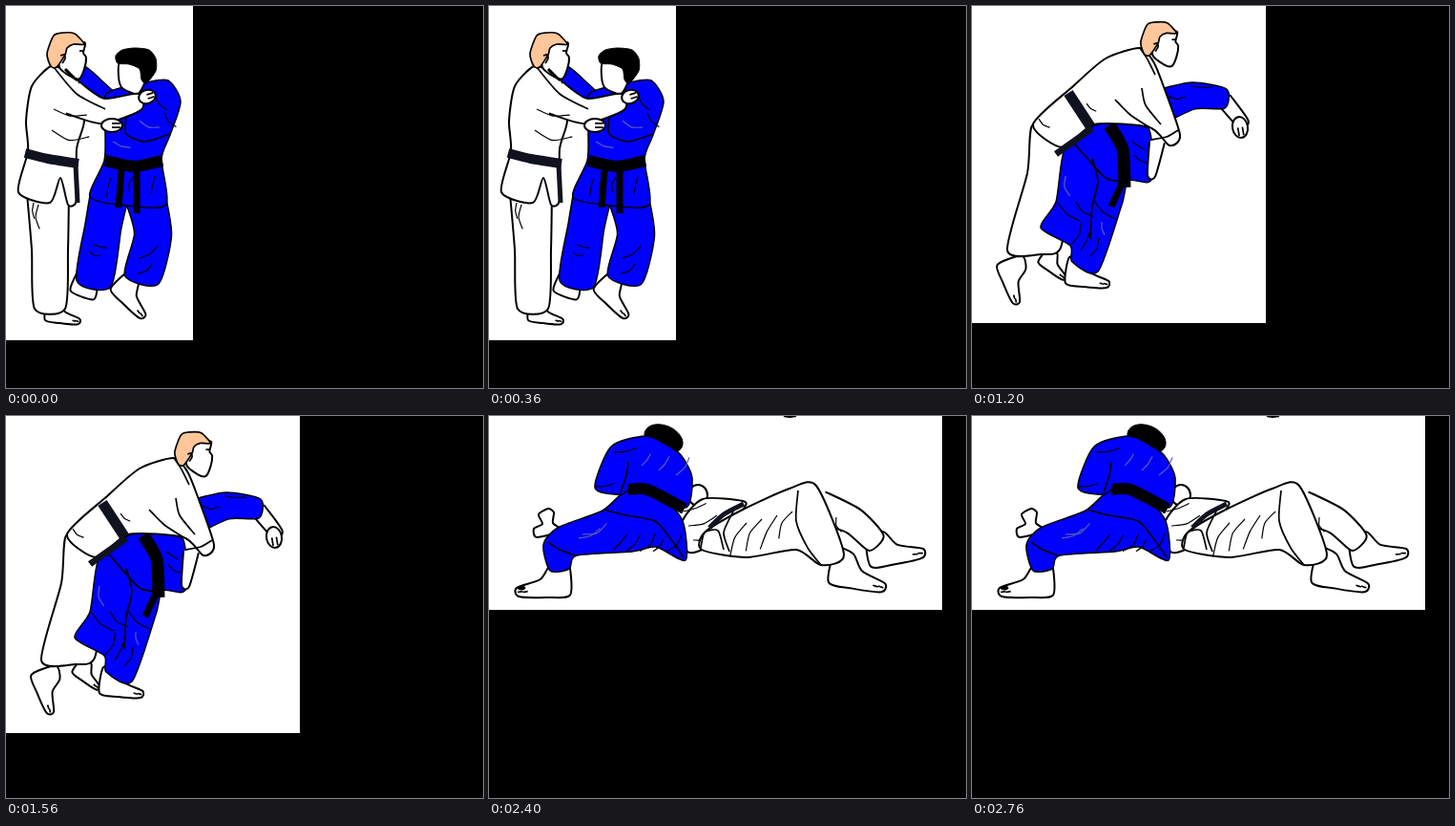
Write an HTML page with a canvas that moves like this. It is 500x400 px and loops after 3 s.

```html
<!DOCTYPE html>
<html lang="en">
<head>
<meta charset="utf-8">
<title>Judo throw</title>
<style>
html, body { margin: 0; width: 100%; height: 100%; overflow: hidden; background: #000; }
canvas { display: block; }
</style>
</head>
<body>
<canvas id="stage" width="500" height="400"></canvas>
<script>
const ctx = document.getElementById('stage').getContext('2d');
const POSE_MS = 600;
const INK = '#000', NAVY = '#10131f', SHEEN = '#5c5cb0';
const white = { fill: '#fff', width: 2 }, blue = { fill: '#00f', width: 1.5 };
const skin = { fill: '#ffc799', width: 1.7 }, black = { fill: INK, width: 1 };

let seed;
const random = () => (seed = (seed * 16807) % 2147483647) / 2147483647;

// Rounded path through x,y pairs.
function trace(c, closed) {
  const n = c.length / 2;
  const at = i => {
    i = closed ? (i + n) % n : Math.max(0, Math.min(n - 1, i));
    return [c[2 * i], c[2 * i + 1]];
  };
  ctx.beginPath();
  ctx.moveTo(c[0], c[1]);
  for (let i = 0; i < (closed ? n : n - 1); i++) {
    const [a, b, d, e] = [at(i - 1), at(i), at(i + 1), at(i + 2)];
    ctx.bezierCurveTo(b[0] + (d[0] - a[0]) / 8, b[1] + (d[1] - a[1]) / 8,
      d[0] - (e[0] - b[0]) / 8, d[1] - (e[1] - b[1]) / 8, d[0], d[1]);
  }
  if (closed) ctx.closePath();
}
function paint(style, c, closed) {
  trace(c, closed);
  ctx.fillStyle = style.fill;
  ctx.fill();
  ctx.strokeStyle = INK;
  ctx.lineWidth = style.width;
  ctx.stroke();
}
const blob = (style, ...c) => paint(style, c, true);

function stroke(color, width, ...c) {
  trace(c, false);
  ctx.strokeStyle = color;
  ctx.lineWidth = width;
  ctx.stroke();
}
const line = (...c) => stroke(INK, 1.7, ...c);

// Tapered tube along a spine, open where it joins the body.
function limb(style, from, to, ...c) {
  const n = c.length / 2, left = [], right = [];
  for (let i = 0; i < n; i++) {
    const a = 2 * Math.max(0, i - 1), b = 2 * Math.min(n - 1, i + 1);
    const dir = Math.atan2(c[b + 1] - c[a + 1], c[b] - c[a]);
    const half = (from + (to - from) * i / (n - 1)) / 2;
    const dx = half * Math.sin(dir), dy = -half * Math.cos(dir);
    left.push(c[2 * i] + dx, c[2 * i + 1] + dy);
    right.unshift(c[2 * i] - dx, c[2 * i + 1] - dy);
  }
  paint(style, [...left, ...right], false);
}
function oval(style, x, y, rx, ry, turned = 0) {
  ctx.beginPath();
  ctx.ellipse(x, y, rx, ry, turned, 0, 7);
  ctx.fillStyle = style.fill;
  ctx.fill();
  ctx.strokeStyle = INK;
  ctx.lineWidth = style.width;
  ctx.stroke();
}
// A row of slightly uneven folds with roots between two points.
function pleats(count, x0, y0, x1, y1, dx, dy, color = INK) {
  for (let i = 0; i < count; i++) {
    const t = count > 1 ? i / (count - 1) : 0, len = 0.7 + 0.5 * random(), bend = 0.2 * random();
    const x = x0 + (x1 - x0) * t, y = y0 + (y1 - y0) * t;
    stroke(color, 1.2, x, y, x + len * (dx / 2 - dy * bend), y + len * (dy / 2 + dx * bend),
      x + len * dx, y + len * dy);
  }
}

// Moves a small local shape into place.
function place(c, x, y, angle, size, flip = 1) {
  const cos = Math.cos(angle) * size, sin = Math.sin(angle) * size, out = [];
  for (let i = 0; i < c.length; i += 2) {
    const u = c[i] * flip, v = c[i + 1];
    out.push(x + u * cos - v * sin, y + u * sin + v * cos);
  }
  return out;
}
function foot(...spot) {
  const sole = [-0.2, -0.4, 0.2, -0.35, 0.45, 0, 1, 0.2, 0.95, 0.4, 0.3, 0.42, -0.25, 0.36];
  blob(white, ...place(sole, ...spot));
  for (const toe of [0.74, 0.86]) line(...place([toe, 0.28, toe + 0.12, 0.3], ...spot));
}
function fist(x, y, rx, ry, angle = 0) {
  oval(white, x, y, rx, ry, angle);
  for (const v of [-0.3, 0.3]) line(...place([0, v * ry, rx * 0.8, v * ry], x, y, angle, 1));
}
function fairHead(...spot) {
  const at = (...c) => place(c, ...spot);
  blob(white, ...at(-6, -6, 18, -12, 17, -1, 20, 4, 18, 16, 13, 26, 4, 24, -8, 14));
  blob(skin, ...at(-17, 13, -21, 0, -14, -19, -4, -22, 8, -21, 18, -10, 7, -10, 0, -6, -2, 1, -11, 14));
  line(...at(-7, 2, -3, 1, -2, 5, -5, 10));
  line(...at(13, -3, 17, -3));
}
function darkHead(...spot) {
  const at = (...c) => place(c, ...spot);
  blob(white, ...at(-16, -6, -18, 10, -14, 22, 2, 28, 10, 14, 8, -2));
  blob(black, ...at(-19, -4, -21, -12, -14, -18, -1, -20, 14, -18, 21, -9, 21, 4, 11, 17, 6, 13, 4, 2, -7, -3));
}

function grip() {
  foot(82, 296, 2, 33, -1);
  foot(125, 293, 0.75, 36);
  foot(49, 319, 0.1, 29);
  limb(blue, 40, 36, 108, 200, 102, 230, 92, 291);
  limb(blue, 42, 36, 147, 204, 154, 240, 142, 287);
  pleats(2, 88, 258, 92, 250, 16, 4);
  pleats(2, 140, 264, 138, 280, 18, -12);
  limb(blue, 22, 18, 110, 102, 92, 84, 76, 70);
  blob(blue, 105, 92, 147, 80, 170, 78, 183, 100, 172, 135, 163, 160, 168, 208, 128, 209,
    88, 200, 103, 162, 104, 130);
  line(126, 116, 126, 134, 146, 142, 172, 134);
  pleats(2, 156, 94, 166, 112, 12, 14);
  pleats(3, 110, 180, 156, 178, -4, 18);
  pleats(2, 112, 142, 140, 120, 18, 6, SHEEN);
  stroke(INK, 12, 104, 162, 134, 168, 164, 162);
  stroke(INK, 7, 121, 172, 118, 211);
  stroke(INK, 7, 137, 173, 137, 217);
  darkHead(136, 64, 0, 1);
  limb(white, 44, 32, 44, 196, 46, 255, 46, 317);
  pleats(2, 29, 206, 34, 208, 1, 22);
  blob(white, 47, 63, 27, 84, 21, 120, 23, 152, 13, 195, 46, 206, 57, 180, 65, 208, 74, 203,
    74, 150, 82, 120, 76, 78, 62, 68);
  limb(white, 36, 17, 70, 96, 102, 110, 140, 100);
  line(50, 64, 74, 92, 104, 108);
  pleats(2, 50, 108, 48, 130, 34, 6);
  stroke(NAVY, 10, 20, 154, 44, 160, 76, 165);
  stroke(NAVY, 5, 73, 166, 75, 206);
  fist(148, 95, 9, 7, -0.3);
  fist(111, 125, 11, 7);
  fairHead(64, 50, 0, 1);
  stroke(INK, 3, 62, 66, 70, 74, 75, 78);
}

function turn() {
  foot(86, 295, 0.3, 33);
  foot(52, 309, 0.25, 32);
  limb(white, 15, 11, 96, 48, 110, 28);
  oval(white, 114, 25, 10, 7, -0.6);
  oval(black, 118, 21, 6, 3, -0.3);
  limb(blue, 38, 16, 102, 84, 96, 47);
  blob(blue, 80, 156, 72, 215, 75, 246, 67, 276, 105, 290, 148, 250, 138, 200, 136, 170);
  pleats(3, 112, 206, 110, 230, 22, 24);
  pleats(3, 76, 244, 100, 280, 26, -8);
  blob(blue, 98, 116, 150, 102, 180, 96, 196, 122, 182, 138, 166, 140, 141, 163, 139, 210,
    78, 182, 87, 142);
  line(156, 108, 154, 128, 166, 135, 182, 138);
  pleats(2, 162, 108, 158, 124, 20, 4);
  pleats(2, 104, 130, 126, 140, 24, -8);
  pleats(2, 90, 158, 140, 146, 14, 8, SHEEN);
  stroke(INK, 11, 87, 142, 120, 152, 141, 162);
  stroke(INK, 7, 122, 157, 107, 192);
  stroke(INK, 7, 134, 164, 127, 205);
  darkHead(155, 73, 0.12, 0.92);
  limb(white, 40, 32, 54, 186, 54, 250, 52, 304);
  pleats(2, 48, 198, 64, 200, -1, 20);
  blob(white, 53, 55, 36, 80, 35, 140, 26, 185, 69, 195, 76, 160, 97, 117, 100, 76, 84, 65);
  limb(white, 44, 20, 82, 92, 120, 95, 156, 94);
  line(53, 55, 66, 72, 88, 92, 120, 102);
  pleats(2, 42, 132, 64, 104, 40, -2);
  pleats(2, 46, 154, 64, 160, -2, 24);
  stroke(NAVY, 9, 34, 142, 58, 150, 81, 156);
  stroke(NAVY, 4, 81, 158, 84, 182, 82, 206);
  fist(166, 97, 9, 6, -0.2);
  fist(136, 117, 17, 6, 0.1);
  fairHead(70, 42, 0, 1);
}

function load() {
  foot(42, 274, 1.15, 36);
  foot(80, 264, 0.6, 26);
  foot(108, 278, 0.08, 36);
  limb(white, 16, 12, 264, 98, 285, 124);
  fist(281, 127, 11, 8, 1.4);
  limb(blue, 36, 20, 196, 106, 232, 94, 266, 97);
  pleats(2, 206, 94, 230, 84, 26, 1);
  blob(white, 64, 124, 58, 175, 37, 256, 72, 260, 94, 250, 100, 150);
  blob(blue, 126, 126, 97, 150, 88, 205, 72, 232, 103, 251, 105, 268, 132, 278, 157, 208,
    164, 183, 188, 182, 185, 128, 150, 122);
  line(104, 140, 116, 154, 140, 180, 160, 184);
  line(126, 160, 132, 184, 126, 210, 124, 244);
  pleats(3, 90, 206, 128, 204, 22, 18);
  pleats(3, 104, 250, 124, 262, 10, -22);
  pleats(2, 168, 142, 170, 156, 12, 8);
  pleats(2, 98, 178, 136, 226, 4, 18, SHEEN);
  stroke(INK, 13, 144, 125, 158, 150, 160, 190);
  stroke(INK, 7, 158, 184, 146, 210);
  limb(white, 16, 8, 194, 142, 188, 178);
  blob(white, 176, 44, 140, 55, 106, 84, 64, 124, 95, 148, 128, 124, 186, 127, 207, 146,
    218, 135, 200, 82, 190, 58);
  line(176, 44, 184, 56, 192, 72);
  line(150, 98, 166, 114, 186, 127);
  line(178, 86, 182, 104, 198, 124);
  line(188, 140, 204, 137, 216, 130);
  pleats(2, 70, 118, 120, 102, 10, 8);
  stroke(NAVY, 11, 101, 91, 124, 126);
  stroke(NAVY, 7, 126, 128, 88, 155);
  fairHead(197, 38, 0, 0.96);
}

function fling() {
  limb(white, 16, 24, 149, 62, 147, 48, 142, 28);
  pleats(2, 137, 38, 143, 48, 14, -4);
  limb(white, 15, 19, 230, 38, 229, 24, 229, 8);
  pleats(2, 226, 16, 232, 16, 0, 14);
  limb(white, 40, 26, 204, 186, 180, 112, 148, 60);
  limb(white, 56, 32, 240, 186, 234, 110, 232, 37);
  line(216, 128, 212, 134, 206, 130);
  line(243, 88, 241, 98, 236, 103);
  pleats(3, 192, 146, 234, 158, 12, 20);
  limb(white, 10, 22, 72, 298, 45, 303, 15, 307);
  pleats(2, 28, 302, 40, 298, 4, 7);
  oval(white, 244, 294, 13, 7);
  limb(blue, 12, 26, 200, 264, 232, 270, 240, 290);
  oval(skin, 289, 251, 17, 18);
  blob(blue, 152, 175, 185, 178, 208, 206, 210, 246, 180, 275, 178, 288, 125, 288, 71, 306,
    64, 290, 72, 269, 106, 261, 135, 220);
  line(150, 200, 160, 216, 178, 222, 198, 214);
  line(135, 221, 152, 219, 170, 224);
  line(112, 262, 116, 280, 128, 288);
  pleats(4, 132, 260, 172, 280, 30, -24);
  pleats(2, 76, 288, 160, 256, 22, -12, SHEEN);
  stroke(INK, 7, 208, 207, 212, 230, 206, 256);
  blob(white, 184, 175, 236, 178, 264, 164, 268, 192, 286, 222, 284, 240, 268, 262, 222, 264,
    205, 257, 212, 225);
  pleats(5, 220, 220, 272, 222, -16, 34);
  line(208, 202, 216, 193, 214, 206, 226, 200, 240, 202);
  stroke(NAVY, 10, 211, 212, 240, 208, 266, 193);
  stroke('#bbb', 0.8, 89, 136, 88, 148);
}

function pin() {
  stroke(INK, 2, 309, 0, 315, 1, 322, 0);
  foot(408, 139, -0.2, 46);
  limb(white, 34, 22, 346, 95, 382, 110, 406, 133);
  pleats(1, 364, 106, 364, 106, 8, 22);
  foot(370, 159, 0.15, 47);
  oval(white, 219, 83, 10, 11);
  blob(white, 202, 112, 224, 87, 266, 89, 266, 98, 230, 136, 208, 142);
  pleats(3, 204, 100, 214, 130, 28, -10);
  blob(white, 264, 99, 315, 76, 343, 73, 372, 145, 348, 156, 322, 140, 270, 148, 223, 140, 226, 122);
  line(324, 78, 322, 110, 334, 138, 348, 156);
  pleats(4, 270, 112, 318, 100, -16, 32);
  line(222, 138, 226, 122, 240, 120, 246, 140);
  line(256, 100, 246, 122, 252, 142);
  stroke(NAVY, 5, 231, 117, 246, 103, 267, 92);
  blob(white, 76, 120, 50, 127, 47, 118, 56, 113, 52, 103, 62, 97, 68, 101, 67, 112);
  foot(74, 171, 0, 45, -1);
  oval(black, 34, 180, 4, 2);
  blob(blue, 146, 77, 119, 99, 72, 117, 57, 135, 64, 162, 84, 160, 92, 146, 150, 142, 175, 137,
    206, 151, 203, 110, 180, 84);
  line(120, 98, 144, 104, 174, 110, 190, 128, 204, 148);
  pleats(5, 130, 141, 186, 142, 14, -16);
  line(90, 146, 74, 140, 62, 132);
  pleats(2, 94, 128, 98, 124, 22, -10, SHEEN);
  oval(black, 183, 24, 21, 14, 0.4);
  blob(blue, 164, 21, 128, 32, 111, 75, 138, 82, 160, 71, 206, 96, 213, 65, 202, 42, 186, 30);
  line(146, 48, 144, 62, 138, 80);
  pleats(2, 112, 74, 130, 38, 22, -4);
  pleats(3, 160, 52, 196, 62, 12, -16, SHEEN);
  stroke(INK, 12, 146, 77, 166, 77, 205, 97);
}

const poses = [
  [grip, 196, 350], [turn, 208, 344], [load, 308, 332], [fling, 328, 327], [pin, 475, 203]
];

function render(now) {
  const [draw, width, height] = poses[Math.floor(now / POSE_MS) % poses.length];
  seed = 7;
  ctx.fillStyle = '#000';
  ctx.fillRect(0, 0, 500, 400);
  ctx.save();
  ctx.beginPath();
  ctx.rect(0, 0, width, height);
  ctx.clip();
  ctx.fillStyle = '#fff';
  ctx.fillRect(0, 0, width, height);
  draw();
  ctx.restore();
}

const start = performance.now();
function tick() {
  render(performance.now() - start);
  requestAnimationFrame(tick);
}
tick();
</script>
</body>
</html>
```
